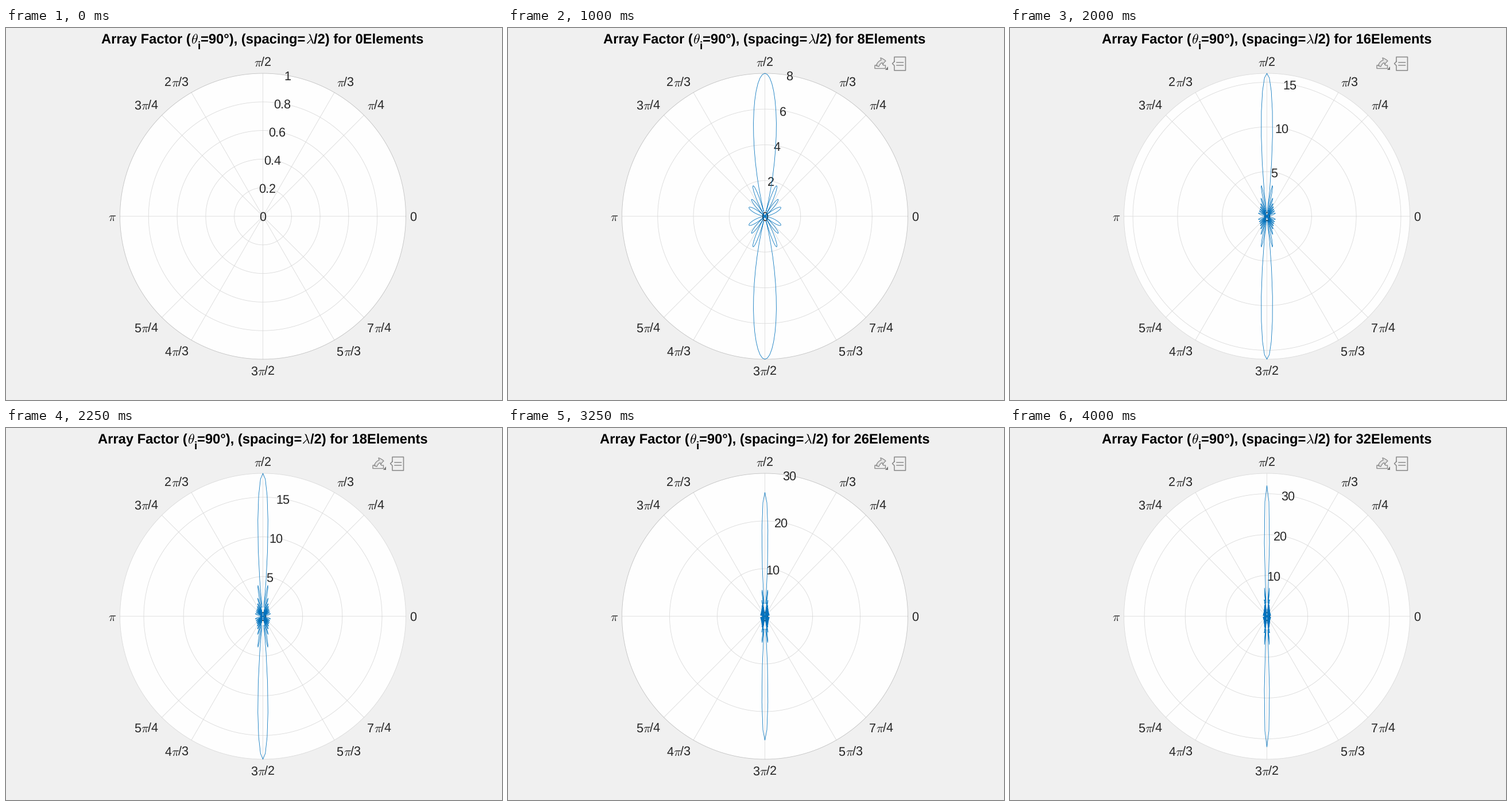
Write a matplotlib script that moves like this. It is 864 by 648 pixels and loops after 4.25 s.

```python
from itertools import groupby

import numpy as np
import matplotlib.pyplot as plt
from matplotlib.animation import FuncAnimation
from matplotlib.patches import Circle, FancyArrowPatch, Polygon
from matplotlib.textpath import TextPath

W, H, DPI = 864, 648, 100
PX = 72 / DPI                      # points per pixel
CX, CY, R = 447.5, 328.0, 249.0
INK, BLUE, ICON = "#262626", "#0072BD", "#8c8c8c"
GRID, RIM = "#d9d9d9", "#c0c0c0"
FONT = "Liberation Sans"
TICK = 21.6                        # font sizes in pixels
TITLE = 1.1 * TICK
THIN = 0.8
GREEK = {"π": (r"$\pi$", 0.57), "θ": (r"$\theta$", 0.5), "λ": (r"$\lambda$", 0.6)}
SUB = "ᵢ"

plt.rcParams["font.family"] = FONT
plt.rcParams["text.hinting"] = "none"

fig = plt.figure(figsize=(W / DPI, H / DPI), dpi=DPI, facecolor="#f0f0f0")
ax = fig.add_axes([0, 0, 1, 1])
ax.set_xlim(0, W)
ax.set_ylim(H, 0)
ax.axis("off")


def polar(r, a):
    return CX + r * np.cos(a), CY - r * np.sin(a)


def stroke(x, y, color, width=THIN, **kw):
    return ax.plot(x, y, color=color, lw=width * PX, snap=False,
                   solid_joinstyle="round", **kw)[0]


def text(x, y, s, size=TICK, **kw):
    kw = {"color": INK, "va": "baseline", **kw}
    return ax.text(x, y, s, fontsize=size * PX, math_fontfamily="cm", **kw)


def advance(s, size, weight):
    """Pen advance of plain text, trailing spaces included."""
    def right(t):
        prop = dict(family=FONT, weight=weight)
        return TextPath((0, 0), t, size=size, prop=prop).get_extents().x1
    return right(s + "|") - right("|")


def row(x, y, s, size=TICK, align=0.0, weight="normal", color=INK):
    """Plain text mixed with Greek letters and subscripts; align 0 to 1."""
    parts = []
    for key, chars in groupby(s, lambda c: c if c in GREEK or c == SUB else ""):
        run, scale, drop = "".join(chars), size, 0
        if key in GREEK:
            run, em = GREEK[key]
            width = em * size
        else:
            if key == SUB:
                run, scale, drop = "i", 0.8 * size, 0.42 * size
            width = advance(run, scale, weight)
        parts.append((run, scale, drop, width))
    x -= align * sum(p[-1] for p in parts)
    made = []
    for run, scale, drop, width in parts:
        made.append(text(x, y + drop, run, scale, weight=weight, color=color))
        x += width
    return made


def angle_label(k):
    """Label for the angle k*pi/12, set just outside the outer circle."""
    a = k * np.pi / 12
    g = np.gcd(k, 12)
    num, den = k // g, 12 // g
    s = "0" if k == 0 else (str(num) if num > 1 else "") + "π"
    if den > 1:
        s += f"/{den}"
    x, y = polar(256, a)
    side, lift = np.sign(np.round([np.cos(a), np.sin(a)], 6))
    align = (1 - side) / 2
    row(x - align, y + 8 - 13 * lift, s, align=align)


def draw_icons():
    """Share and note icons at the upper right of the plot."""
    note = stroke([673, 673, 692.5, 692.5, 673, 673, 669.5, 673],
                  [58.5, 50.5, 50.5, 74, 74, 65.5, 62, 58.5], ICON, 1.6)
    bars = [stroke([677, 688.5], [y, y], ICON, 1.5) for y in (60, 65)]
    tray = stroke([643, 639, 639, 657.5, 657.5, 654],
                  [65, 65, 70.5, 70.5, 65, 65], ICON, 1.4)
    arrow = FancyArrowPatch(
        (643.5, 66.5), (658, 57.5), shrinkA=0, shrinkB=0, mutation_scale=PX,
        connectionstyle="arc3,rad=-0.4",
        arrowstyle="simple,head_length=7,head_width=13,tail_width=5",
        fc="#e4e4e4", ec=ICON, lw=1.3 * PX)
    corner = Polygon([(662, 67), (662, 72.5), (656.5, 72.5)], fc="#777777")
    ax.add_patch(arrow)
    ax.add_patch(corner)
    return [note, *bars, tray, arrow, corner]


# Fixed parts
ax.add_patch(Circle((CX, CY), R, fc="#fefefe", ec="none", zorder=0))
for k in range(24):
    if k % 3 == 0 or k % 4 == 0:
        angle_label(k)
        stroke(*polar(np.array([0, R]), k * np.pi / 12), GRID, zorder=1)

# Parts that change with the element count
theta = np.radians(np.arange(361))
outline = stroke(*polar(R, theta), GRID, zorder=2)
rings = [stroke([], [], GRID, zorder=1) for _ in range(5)]
marks = [text(0, 0, "", ha="center", zorder=4) for _ in range(6)]
curve = stroke([], [], BLUE, zorder=5)
icons = draw_icons()
title = []


def scale(n):
    """Radial limit and tick step: up to five steps of 2, else up to four."""
    limit = max(n, 1) if n <= 20 else 5 * int(np.ceil(n / 5))
    for e in (-1, 0, 1):
        for lead in (1, 2, 5):
            step = lead * 10.0 ** e
            if limit <= (5 if lead == 2 else 4) * step:
                return limit, step


def array_factor(n):
    psi = np.pi * np.cos(theta)
    k = np.arange(n)[:, None]
    return np.abs(np.exp(1j * k * psi).sum(axis=0))


def update(i):
    n = 2 * i
    limit, step = scale(n)
    count = int(limit / step + 1e-9)

    for j, mark in enumerate(marks):
        x, y = polar(R * j * step / limit, np.radians(80))
        mark.set_position((x - 0.8, y + 8.2))
        mark.set_text(f"{j * step:g}" if j <= count else "")
    for j, ring in enumerate(rings, 1):
        ring.set_data(*polar(R * j * step / limit, theta))
        ring.set_visible(j * step < limit - 1e-9)
    outline.set_color(RIM if abs(count * step - limit) < 1e-9 else GRID)

    curve.set_data(*polar(R * array_factor(n) / limit, theta))
    for part in (curve, *icons):
        part.set_visible(n > 0)

    while title:
        title.pop().remove()
    title.extend(row(447, 27, f"Array Factor (θᵢ=90°), (spacing=λ/2) for {n}Elements",
                     TITLE, 0.5, "bold", "black"))
    return []


anim = FuncAnimation(fig, update, frames=17, interval=250,
                     init_func=lambda: update(0), repeat=True, repeat_delay=0)
plt.show()
```
